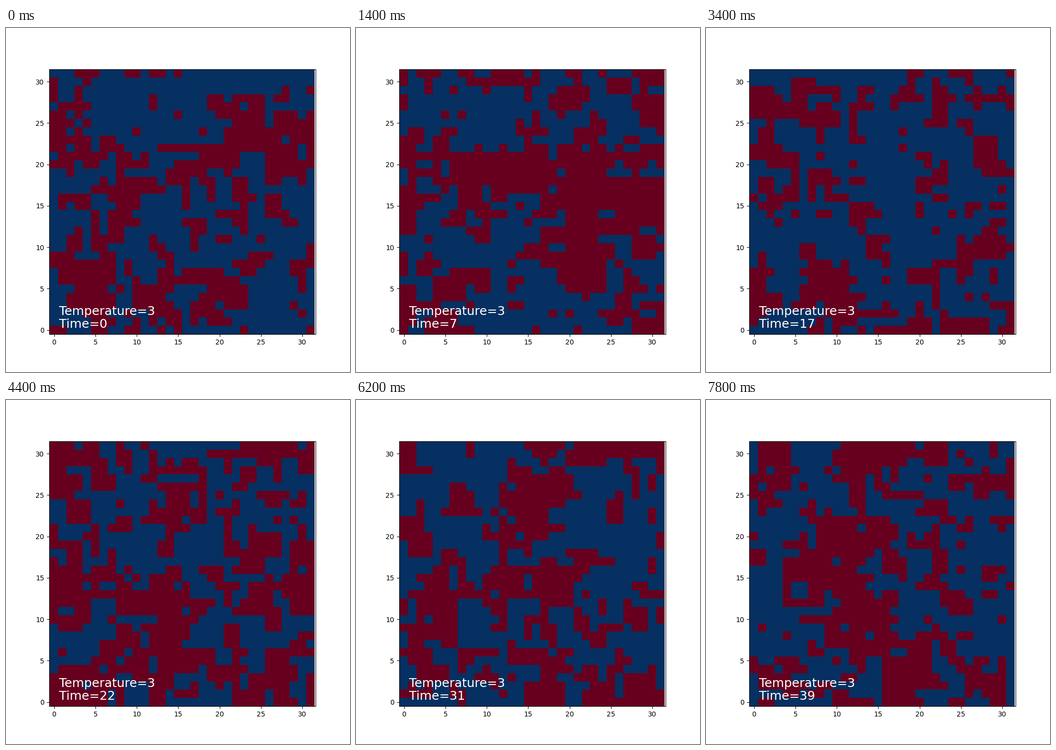
These frames come from a looping animation (700 px wide and 700 px high, 8000 ms). A matplotlib script:

```python
import math
import random

import matplotlib.pyplot as plt
import numpy as np
from matplotlib.animation import FuncAnimation

SIZE = 32
TEMPERATURE = 3
FRAMES = 40
INTERVAL = 200
WARM_UP = 60


def sweep(spins, rng):
    """One Metropolis pass over every site of the periodic lattice."""
    for i in range(SIZE):
        for j in range(SIZE):
            near = (spins[i - 1][j] + spins[(i + 1) % SIZE][j]
                    + spins[i][j - 1] + spins[i][(j + 1) % SIZE])
            cost = 2 * spins[i][j] * near
            if cost <= 0 or rng.random() < math.exp(-cost / TEMPERATURE):
                spins[i][j] *= -1


def simulate(seed):
    rng = random.Random(seed)
    spins = [[rng.choice((-1, 1)) for _ in range(SIZE)] for _ in range(SIZE)]
    for _ in range(WARM_UP):
        sweep(spins, rng)
    states = []
    for _ in range(FRAMES):
        states.append(np.array(spins))
        sweep(spins, rng)
    return states


states = simulate(seed=7)

fig, ax = plt.subplots(figsize=(7, 7), dpi=100)
image = ax.imshow(states[0], cmap="RdBu", vmin=-1, vmax=1, origin="lower")
ax.axis("equal")

label = dict(color="white", fontsize=18)
ax.text(0.6, 1.8, f"Temperature={TEMPERATURE}", **label)
clock = ax.text(0.6, 0.25, "Time=0", **label)


def update(frame):
    image.set_data(states[frame])
    clock.set_text(f"Time={frame}")
    return image, clock


anim = FuncAnimation(fig, update, frames=FRAMES, interval=INTERVAL,
                     repeat=True, repeat_delay=0)
plt.show()
```
